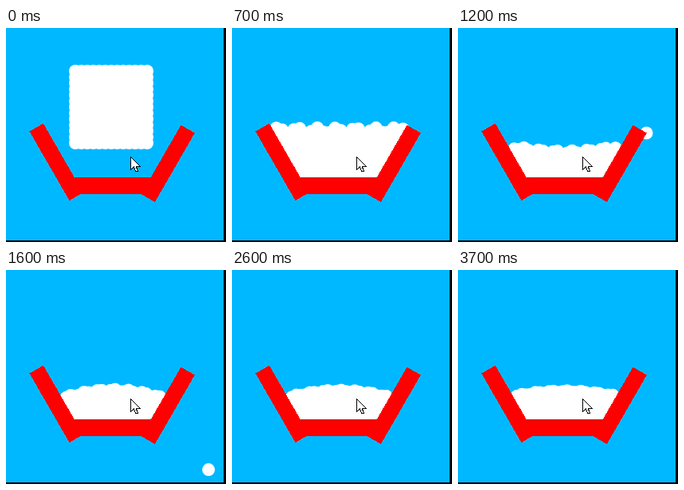
Animation of 276 by 268 pixels, one loop 3.8 s. Source, as an HTML page with a canvas:

```html
<!DOCTYPE html>
<html lang="en">
<head>
<meta charset="utf-8">
<title>Particles in a tub</title>
<style>
html, body { margin: 0; width: 100%; height: 100%; overflow: hidden; background: #00b8ff; }
canvas, svg { position: absolute; left: 0; top: 0; }
</style>
</head>
<body>
<canvas id="stage" width="276" height="268"></canvas>
<svg width="276" height="268" shape-rendering="crispEdges">
  <g fill="#f00">
    <path d="M29.5 129.5 L46.8 119.5 L96.8 206.1 L79.5 216.1Z"/>
    <path d="M219.5 121.5 L236.8 131.5 L186.8 218.1 L169.5 208.1Z"/>
    <path d="M84 188 H183 V208 H84Z"/>
  </g>
  <path d="M273 0 H276 V268 H0 V266 H273Z"/>
  <path d="M156.5 161.5 v16 l4 -3.5 l2.5 6 l2.5 -1 l-2.5 -6 h5Z" fill="#fff" stroke="#000"/>
</svg>
<script>
const ctx = document.getElementById('stage').getContext('2d');
const LOOP = 3800, STEP = 100, LAND = 300, R = 8, N = 22;

const lerp = (a, b, k) => a + (b - a) * k;
const clamp = v => Math.max(0, Math.min(1, v));

function ball(x, y) {
  ctx.beginPath();
  ctx.arc(x, y, R, 0, 7);
  ctx.fill();
}

function drawBlock(t) {
  const top = 54 + 42 * (t / LAND) ** 2;
  const gap = Math.min(7.5, (180 - top) / 12);
  for (let row = 0; row < 13; row++)
    for (let col = 0; col < 13; col++) ball(87 + col * 7.5, top + row * gap);
}

// Centre height of the top balls, u from -1 (left) to 1 (right):
// the level sinks, the curve sloshes, the bumps calm down.
function height(u, i, t, spread) {
  const level = 88 + 58 * (1 - (1 - clamp((t - LAND) / 900)) ** 1.4);
  const slosh = 1 + 14 * clamp((t - 500) / 1500) * Math.cos(2 * Math.PI * (t - 2200) / 1130);
  const rough = spread * (1 + 5 * Math.exp((LAND - t) / 600));
  return R + level + slosh * (1 / 3 - u * u) + rough * Math.sin(i * 1.9 + t / 170);
}

function drawHeap(t) {
  const spread = clamp((t - LAND) / 300);
  const ys = Array.from({ length: N }, (_, i) => height(i / (N - 1) * 2 - 1, i, t, spread));
  const left = lerp(87, 51.8 + (ys[0] - 119) * 0.577, spread);
  const right = lerp(177, 215.7 - (ys[N - 1] - 119) * 0.577, spread);
  const xs = ys.map((_, i) => lerp(left, right, i / (N - 1)));

  ctx.beginPath();
  ctx.moveTo(87, 188);
  xs.forEach((x, i) => ctx.lineTo(x, ys[i]));
  ctx.lineTo(177, 188);
  ctx.fill();
  xs.forEach((x, i) => ball(x, ys[i]));
  for (let i = 0; i <= 12; i++) {
    ball(lerp(left, 87, i / 12), lerp(ys[0], 180, i / 12));
    ball(lerp(right, 177, i / 12), lerp(ys[N - 1], 180, i / 12));
  }
}

// One ball rolls over the right rim and drops.
function drawStray(t) {
  if (t < 700 || t > 1800) return;
  const s = (t - 1200) / 1000;
  ball(236.5 + 44 * s, 131.5 + 110 * s + (s < 0 ? 200 : 466) * s * s);
}

function draw(now) {
  const t = Math.floor(now % LOOP / STEP) * STEP;
  ctx.clearRect(0, 0, 276, 268);
  ctx.fillStyle = '#fff';
  if (t <= LAND) drawBlock(t);
  else drawHeap(t);
  drawStray(t);
  ctx.fillStyle = t < LAND ? '#f00' : '#743838';
  ctx.fillRect(85, 187, 98, 1);
}

const start = performance.now();
function tick() {
  draw(performance.now() - start);
  requestAnimationFrame(tick);
}
tick();
</script>
</body>
</html>
```
